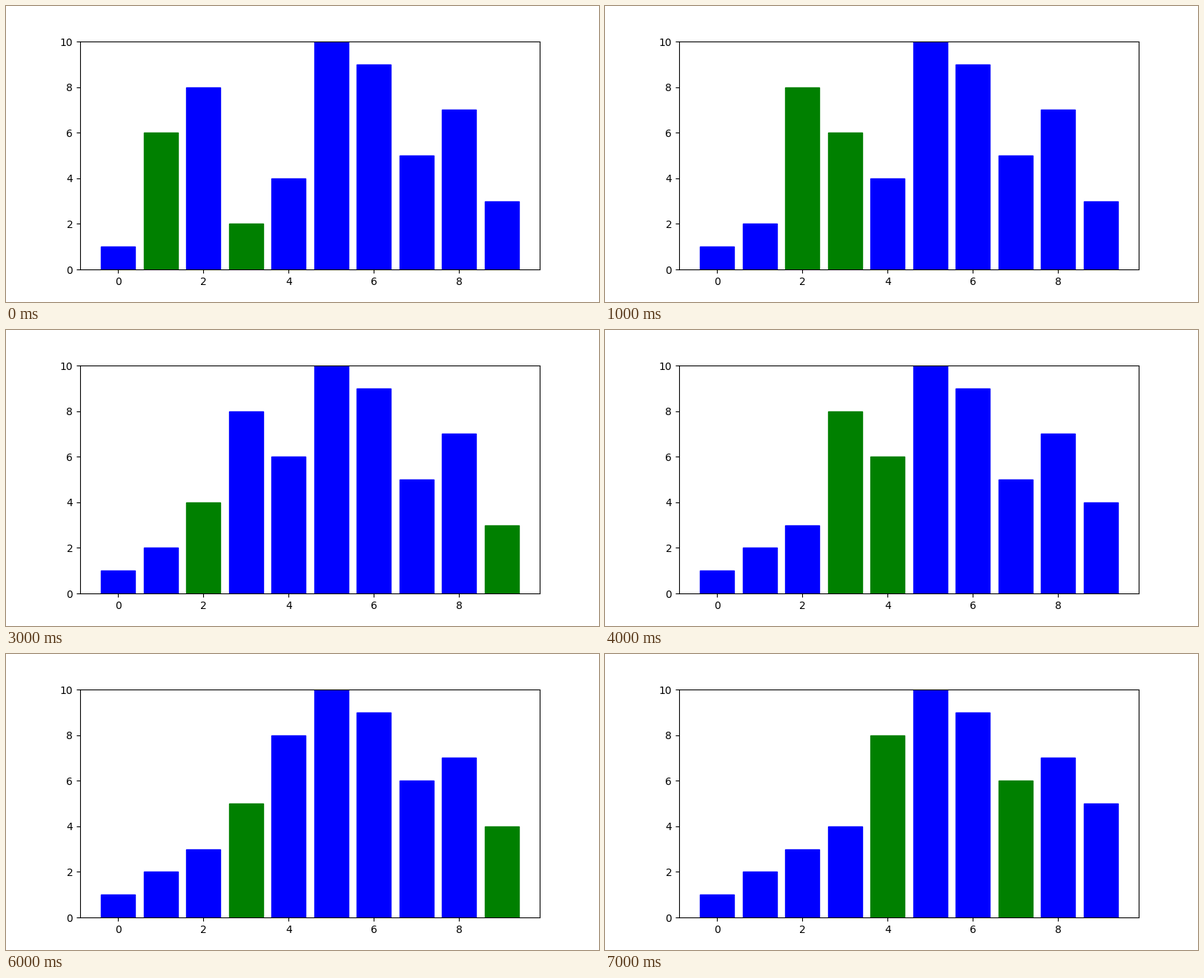
Animation, 800 px wide and 400 px high, one loop 8000 ms. Source, as a matplotlib script:

```python
import matplotlib.pyplot as plt
from matplotlib.animation import FuncAnimation

START = [1, 6, 8, 2, 4, 10, 9, 5, 7, 3]
STEPS = 8
STEP_MS = 1000


def exchange_sort(values):
    """Yield the values and the pair about to be swapped."""
    values = list(values)
    for i in range(len(values)):
        for j in range(i + 1, len(values)):
            if values[i] > values[j]:
                yield list(values), (i, j)
                values[i], values[j] = values[j], values[i]


steps = [step for step, _ in zip(exchange_sort(START), range(STEPS))]

fig, ax = plt.subplots(figsize=(8, 4), dpi=100)
bars = ax.bar(range(len(START)), START)
ax.set_ylim(0, 10)


def draw(frame):
    values, pair = steps[frame]
    for k, (bar, value) in enumerate(zip(bars, values)):
        bar.set_height(value)
        # set_color also paints the one-point outline
        bar.set_color("green" if k in pair else "blue")
    return list(bars)


anim = FuncAnimation(fig, draw, frames=STEPS, init_func=lambda: draw(0),
                     interval=STEP_MS, repeat=True, repeat_delay=0)
plt.show()
```
